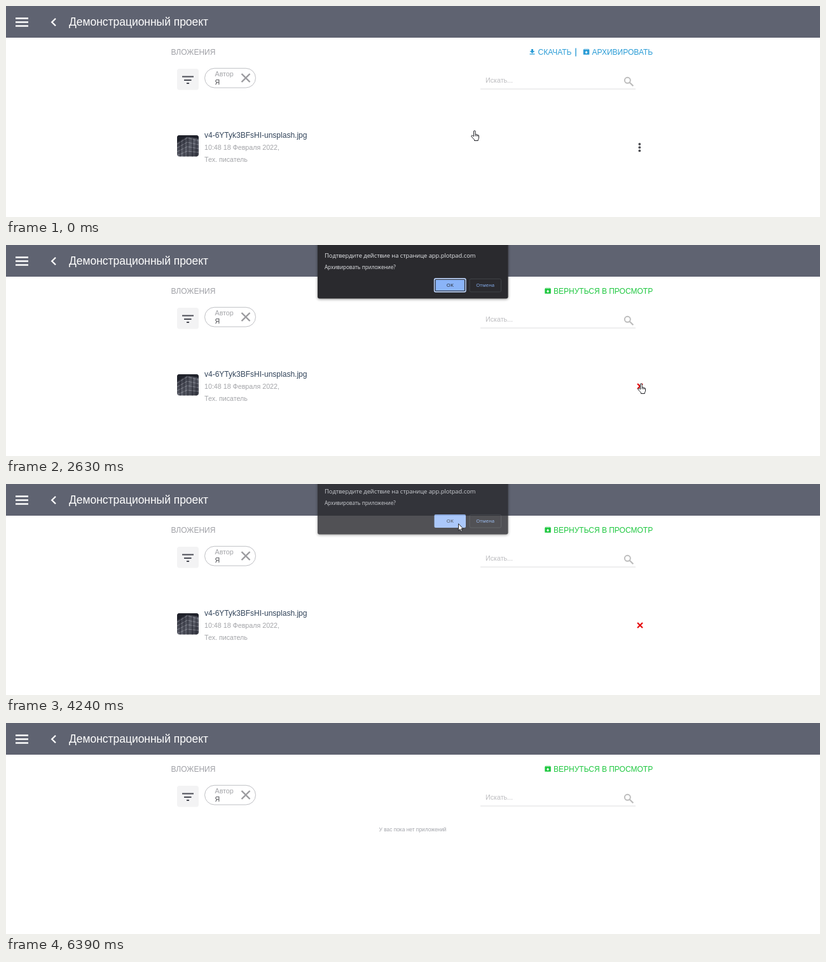
An HTML page for the animation above (6650 ms loop, 1280x333 px).

```html
<!DOCTYPE html>
<html lang="ru">
<head>
<meta charset="utf-8">
<title>Вложения</title>
<style>
html, body { margin: 0; width: 100%; height: 100%; overflow: hidden; background: #fff; }
svg { display: block; width: 100%; height: 100%; }
text { font-family: "Liberation Sans", Arial, sans-serif; white-space: pre; }
.caps { font-size: 12px; }
.small { font-size: 10.7px; fill: #a3a4a8; }
.ui { font-family: "Open Sans", "Noto Sans", sans-serif; fill: #e8eaed; }
.line { fill: none; }
</style>
</head>
<body>
<svg viewBox="0 0 1280 333" xmlns="http://www.w3.org/2000/svg">
  <defs>
    <linearGradient id="photo" x1="0" y1="0" x2="1" y2="1">
      <stop offset="0" stop-color="#23252f"/>
      <stop offset=".55" stop-color="#5b5e69"/>
      <stop offset="1" stop-color="#33353f"/>
    </linearGradient>
    <clipPath id="thumb"><rect x="269" y="204" width="34" height="33.500" rx="4"/></clipPath>
    <filter id="shadow" x="-10%" y="-20%" width="120%" height="150%">
      <feDropShadow dx="0" dy="1" stdDeviation="2" flood-opacity=".45"/>
    </filter>
    <path id="box" fill-rule="evenodd" d="M1.200 0H8.300L9.500 1.500V8.500Q9.500 9 9 9H.5Q0 9 0 8.500V1.500zM1.200 1.300H8.300L7.900 .8H1.600zM4 3.300V5H2.300L4.750 7.400L7.200 5H5.500V3.300z"/>
  </defs>

  <!-- header -->
  <rect width="1280" height="50" fill="#5f6371"/>
  <path class="line" stroke="#fff" stroke-width="2.300" d="M15 19.500H35M15 25.500H35M15 31.500H35"/>
  <path class="line" stroke="#fff" stroke-width="2.300" d="M78 19.700L72.200 25.500L78 31.300"/>
  <text x="99" y="30.800" font-size="17.450" fill="#fff">Демонстрационный проект</text>

  <!-- toolbar -->
  <text class="caps" x="259.500" y="77" fill="#9fa0a6">ВЛОЖЕНИЯ</text>
  <g id="browse" fill="#2a9cd6">
    <path d="M826 68H829V71H831.500L827.500 74.700L823.500 71H826zM823.500 75.300H831.500V76.500H823.500z"/>
    <text class="caps" x="836.500" y="77">СКАЧАТЬ</text>
    <rect x="895.300" y="66.500" width="1.400" height="13"/>
    <use href="#box" x="907.800" y="67.800"/>
    <text class="caps" x="921.500" y="77">АРХИВИРОВАТЬ</text>
  </g>
  <g id="archive" fill="#1fc840">
    <use href="#box" x="847.300" y="67.800"/>
    <text class="caps" x="861" y="77">ВЕРНУТЬСЯ В ПРОСМОТР</text>
  </g>

  <!-- filter and search -->
  <rect x="269" y="99" width="34" height="33.500" rx="4" fill="#f3f3f4"/>
  <path class="line" stroke="#4a4c55" stroke-width="2" d="M277 111.500H295M280 117H291.500M284 122H288"/>
  <rect x="312.500" y="98.300" width="80" height="30.700" rx="15.350" fill="#fff" stroke="#bfc0c4"/>
  <text class="small" x="328.500" y="110.500">Автор</text>
  <text class="small" x="328.500" y="123.700" style="fill:#4a4b50">Я</text>
  <path class="line" stroke="#9a9a9e" stroke-width="2.400" d="M370.500 107L383.500 120M383.500 107L370.500 120"/>
  <text class="small" x="754" y="120.500" style="fill:#bcbcbf">Искать...</text>
  <rect x="746" y="130.500" width="244" height="1" fill="#dedee0"/>
  <circle class="line" cx="977.300" cy="117.300" r="4.500" stroke="#bcbcbc" stroke-width="1.900"/>
  <path class="line" stroke="#bcbcbc" stroke-width="2.300" d="M980.700 120.700L986.300 126.200"/>

  <!-- attachment -->
  <g id="row">
    <g clip-path="url(#thumb)">
      <rect x="269" y="204" width="34" height="34" fill="url(#photo)"/>
      <path d="M269 204H303V210L285 206L269 215z" fill="#20222b"/>
      <path class="line" stroke="#a9acb5" stroke-opacity=".65" stroke-width=".9" d="M269 218L285 208L303 213M269 224L285 215L303 219M269 230L285 222L303 225M269 236L285 229L303 231"/>
      <path class="line" stroke="#1d1f28" stroke-opacity=".7" stroke-width="1.300" d="M274 209V238M280 207V238M286 206V238M293 209V238M299 210V238"/>
    </g>
    <text class="caps" x="312" y="207.500" fill="#32445a">v4-6YTyk3BFsHI-unsplash.jpg</text>
    <text class="small" x="312" y="227.300">10:48 18 Февраля 2022,</text>
    <text class="small" x="312" y="246">Тех. писатель</text>
    <g id="dots" fill="#4c4d52">
      <circle cx="996.300" cy="218" r="1.900"/>
      <circle cx="996.300" cy="223.200" r="1.900"/>
      <circle cx="996.300" cy="228.400" r="1.900"/>
    </g>
    <path id="remove" class="line" stroke="#e60d10" stroke-width="2.300" d="M993 219L1001 227M1001 219L993 227"/>
  </g>
  <text id="empty" x="586.500" y="171.200" font-size="8.400" fill="#a3a5ab">У вас пока нет приложений</text>

  <!-- confirm dialog -->
  <g id="dialog">
    <path d="M490 -30H789.500V81.500Q789.500 84.500 786.500 84.500H493Q490 84.500 490 81.500z" fill="#292a2d" filter="url(#shadow)"/>
    <text class="ui" x="501" y="20" font-size="9.300">Подтвердите действие на странице app.plotpad.com</text>
    <text class="ui" x="501" y="38.300" font-size="8.100">Архивировать приложение?</text>
    <rect id="ok" x="673.500" y="53" width="49.500" height="21" rx="2" fill="#8ab4f8"/>
    <g id="ring" class="line">
      <rect x="673.500" y="53" width="49.500" height="21" rx="2" stroke="#c3d8fb" stroke-width="1.300"/>
      <rect x="675" y="54.500" width="46.500" height="18" rx="1" stroke="#292a2d" stroke-width="1.200"/>
    </g>
    <text class="ui" x="698.300" y="66.300" font-size="7.800" text-anchor="middle" style="fill:#202124">OK</text>
    <rect class="line" x="729" y="53.500" width="49.500" height="20.500" rx="2" stroke="#3f4246"/>
    <text class="ui" x="753.700" y="66.300" font-size="7.700" text-anchor="middle" style="fill:#8ab4f8">Отмена</text>
  </g>

  <!-- pointer -->
  <g id="pointer" fill="#fff" stroke="#25262b" stroke-linejoin="round">
    <path id="hand" d="M4.500 10V2a1.300 1.300 0 0 1 2.600 0V6.600q1.300-.8 2 .5q1.400-.6 1.800.6q1.500-.2 1.600 1.200V12q-.2 2-1.200 3V16.500H5.500V15Q3 12.500 1 10q-.6-1.500.6-1.900q1.500 0 2.900 1.900zM7.100 7V9.500M9.100 7.300V9.500M10.900 7.900V9.700"/>
    <path id="arrow" d="M.5.700V11.700L3 9.400L4.800 13.300L6.500 12.500L4.800 8.700H8z"/>
  </g>
</svg>
<script>
const LOOP = 6650;
const el = id => document.getElementById(id);
const show = (id, on) => { el(id).style.display = on ? '' : 'none'; };
const ramp = (t, a, b) => Math.min(1, Math.max(0, (t - a) / (b - a)));

// pointer stops: time, x, y
const path = [
  [0, 731, 196], [400, 959, 61], [530, 959, 61], [620, 958.5, 64],
  [1480, 958.5, 64], [1510, 960, 67], [1780, 1013, 142], [2130, 999, 219],
  [2180, 999, 219], [2290, 993, 218], [2820, 993, 218], [2880, 988, 222],
  [3040, 875, 170], [3200, 764, 119], [3500, 723, 67], [3600, 723, 67],
  [3900, 711, 62], [4245, 711, 62], [4450, 749, 172], [5720, 749, 172],
  [5830, 751, 179], [6390, 358, 333], [LOOP, 358, 340]
];

const same = (a, b) => a[1] === b[1] && a[2] === b[2];

// speed at a stop, zero next to a rest
function speed(i, k) {
  const a = path[i - 1], p = path[i], b = path[i + 1];
  if (!a || !b || same(a, p) || same(p, b)) return 0;
  return (b[k] - a[k]) / (b[0] - a[0]);
}

function at(t, k) {
  let i = 0;
  while (i < path.length - 2 && t >= path[i + 1][0]) i++;
  const a = path[i], b = path[i + 1], d = b[0] - a[0];
  const u = (t - a[0]) / d, u2 = u * u, u3 = u2 * u;
  return a[k] * (2 * u3 - 3 * u2 + 1) + b[k] * (3 * u2 - 2 * u3)
    + d * (speed(i, k) * (u3 - 2 * u2 + u) + speed(i + 1, k) * (u3 - u2));
}

function draw(t) {
  const archive = t >= 820, emptied = t >= 5500;
  show('browse', !archive);
  show('dots', !archive);
  show('archive', archive);
  show('remove', archive);
  show('row', !emptied);
  show('empty', emptied);

  const k = ramp(t, 2390, 2600) * (1 - ramp(t, 4200, 4420));
  const drop = t < 3000 ? 18 : 27;
  show('dialog', k > 0);
  el('dialog').setAttribute('opacity', k);
  el('dialog').setAttribute('transform', `translate(0 ${-drop * (1 - k)})`);
  show('ring', t < 4080);
  el('ok').setAttribute('fill', t < 3750 ? '#8ab4f8' : '#98bcf9');

  const hand = t < 3380;
  show('hand', hand);
  show('arrow', !hand);
  show('pointer', t < 6390);
  el('pointer').setAttribute('transform', `translate(${at(t, 1)} ${at(t, 2)})`);
}

const start = performance.now();
function tick() {
  draw((performance.now() - start) % LOOP);
  requestAnimationFrame(tick);
}
tick();
</script>
</body>
</html>
```
